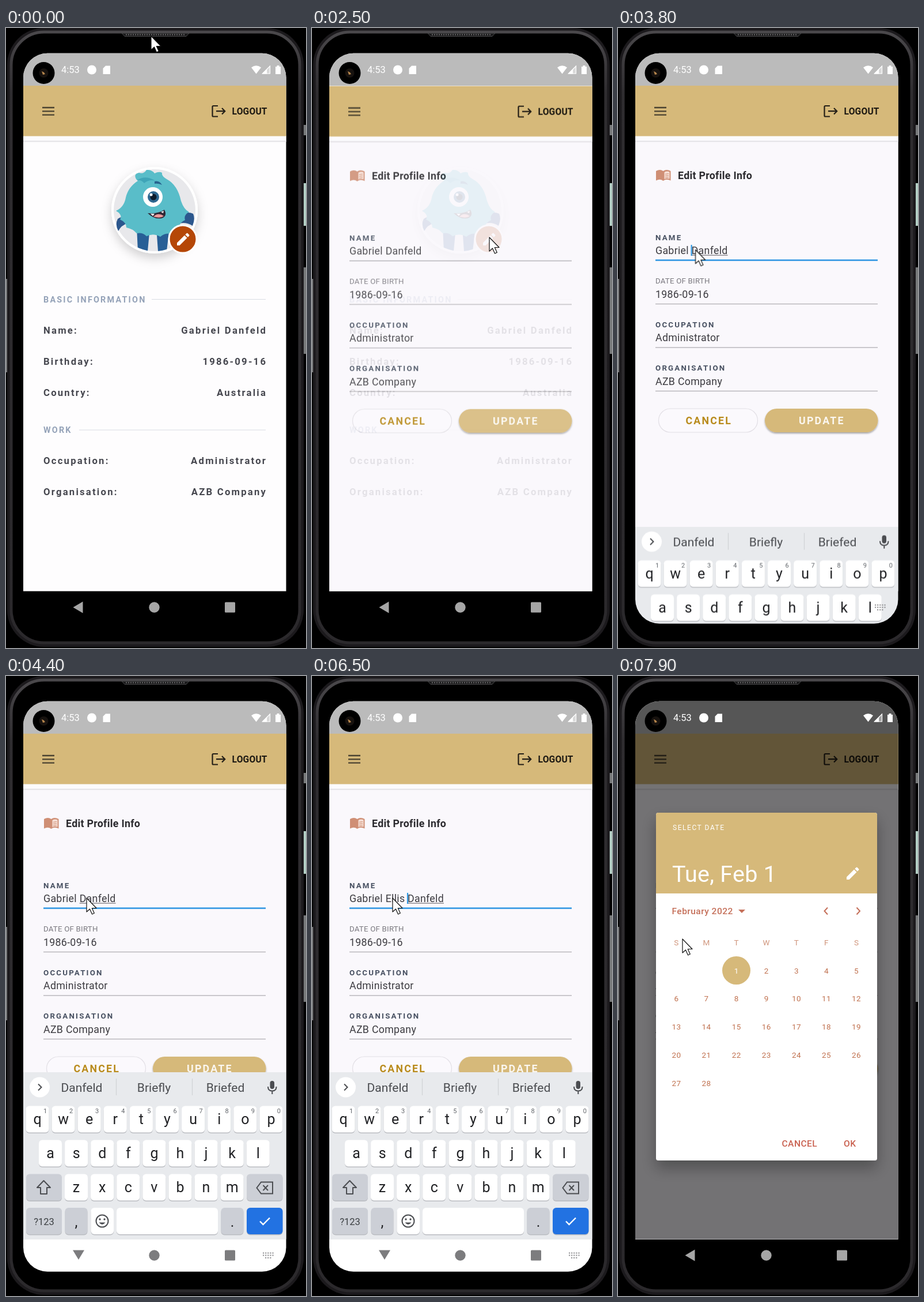
Write an HTML page that moves like this. It is 521 px wide and 1075 px high and loops after 8 s.

```html
<!DOCTYPE html>
<html lang="en">
<head>
<meta charset="utf-8">
<title>Profile editor</title>
<style>
html, body { margin: 0; width: 100%; height: 100%; overflow: hidden; background: #000; }
svg { display: block; width: 100vw; height: 100vh; }
text { font-family: Roboto, sans-serif; white-space: pre; }
.end { text-anchor: end; }
.mid { text-anchor: middle; }
.row { font-size: 16.7px; font-weight: 700; letter-spacing: 2.22px; fill: #46474f; }
.section { font-size: 14.4px; font-weight: 700; letter-spacing: 2.2px; fill: #94a2b8; }
.label { font-size: 13.3px; font-weight: 700; letter-spacing: 2.2px; fill: #475061; }
.plain { font-size: 13.3px; letter-spacing: .2px; fill: #7b7980; }
.value { font-size: 17.78px; letter-spacing: .3px; fill: #3c3b40; }
.title { font-size: 17.78px; font-weight: 700; letter-spacing: .3px; fill: #2b2a2e; }
.btn { font-size: 17.78px; font-weight: 700; letter-spacing: 2.2px; }
.key { font-size: 25px; fill: #202124; }
.num { font-size: 11px; fill: #5f6368; }
.hint { font-size: 21px; fill: #4a4c50; }
.day { font-size: 13.5px; letter-spacing: .4px; fill: #c0714f; }
.accent { font-size: 15.56px; font-weight: 500; letter-spacing: .45px; fill: #c5705a; }

#cursor { animation: point 8s linear infinite; }
#form { animation: rise 8s infinite, reveal 8s infinite; }
#focus { animation: focus 8s linear infinite; }
#cover { animation: cover 8s step-end infinite; }
#kb { animation: slide 8s infinite; }
#navDark { animation: dark 8s linear infinite; }
#navLight { animation: light 8s linear infinite; }
#kbIcon { animation: icon 8s step-end infinite; }
#dialog { animation: dialog 8s ease-out infinite; }

@keyframes point {
  0% { transform: translate(252px, 14px); }
  11.25% { transform: translate(262px, 300px); }
  17.5% { transform: translate(290px, 340px); }
  22.5%, 33.75% { transform: translate(308px, 363px); }
  36.25%, 37.5% { transform: translate(102px, 394px); }
  38.75%, 46.25% { transform: translate(129px, 384px); }
  48.75%, 83.75% { transform: translate(140px, 385px); }
  90%, 100% { transform: translate(112px, 456px); }
}
@keyframes rise {
  0%, 27.79% { transform: translateY(234px); animation-timing-function: cubic-bezier(.4, 0, .2, 1); }
  31.54%, 100% { transform: none; }
}
@keyframes reveal {
  0%, 27.79% { opacity: 0; animation-timing-function: ease-in; }
  31.54%, 100% { opacity: 1; }
}
@keyframes focus {
  0%, 43.75% { stroke: #b9b7bc; stroke-width: 1.3px; }
  46.25%, 94.4% { stroke: #3d9de4; stroke-width: 2.7px; }
  96.25%, 100% { stroke: #b9b7bc; stroke-width: 1.3px; }
}
@keyframes cover { 0% { opacity: 0; } 50% { opacity: 1; } 95% { opacity: 0; } }
@keyframes slide {
  0%, 46.25% { transform: translateY(350px); animation-timing-function: ease-out; }
  50%, 92.5% { transform: none; animation-timing-function: linear; }
  93.75% { transform: translateY(198.5px); animation-timing-function: linear; }
  94.9%, 100% { transform: translateY(350px); }
}
@keyframes dark { 0%, 46.25% { opacity: 1; } 47.25%, 92.5% { opacity: 0; } 93.75% { opacity: .15; } 95%, 100% { opacity: 1; } }
@keyframes light { 0%, 47.5% { opacity: 0; } 49.5%, 92.5% { opacity: 1; } 93.5%, 100% { opacity: 0; } }
@keyframes icon { 0% { opacity: 0; } 43.75% { opacity: 1; } 93% { opacity: 0; } }
@keyframes dialog { 0%, 95.6% { opacity: 0; } 98.2%, 100% { opacity: 1; } }
</style>
</head>
<body>
<svg viewBox="0 0 521 1075" preserveAspectRatio="none">
<defs>
  <clipPath id="screen"><rect x="30" y="43.7" width="456.5" height="989" rx="42"/></clipPath>
  <clipPath id="body"><rect x="30" y="100" width="457" height="876.5"/></clipPath>
  <clipPath id="disc"><circle cx="258" cy="316" r="71"/></clipPath>
  <linearGradient id="rim" x2="0" y2="1">
    <stop offset="0" stop-color="#4a484b"/>
    <stop offset=".1" stop-color="#2f2d30"/>
    <stop offset="1" stop-color="#2b292c"/>
  </linearGradient>
  <filter id="soft" x="-30%" y="-30%" width="160%" height="170%">
    <feDropShadow dx="0" dy="8" stdDeviation="9" flood-opacity=".18"/>
  </filter>
  <filter id="low" x="-10%" y="-20%" width="120%" height="160%">
    <feDropShadow dx="0" dy="2" stdDeviation="1.5" flood-opacity=".35"/>
  </filter>
  <filter id="deep" x="-20%" y="-10%" width="140%" height="125%">
    <feDropShadow dx="0" dy="13" stdDeviation="13" flood-opacity=".3"/>
  </filter>
  <g id="bar">
    <rect x="30" y="187" width="457" height="10" fill="#fcfbfd"/>
    <path d="M30 196.5H487" stroke="#e3e1e5" stroke-width="2"/>
    <rect x="30" y="100" width="457" height="87.5" fill="#d6b97a"/>
    <path d="M63 138H84M63 144.3H84M63 150.6H84" stroke="#4a4230" stroke-width="2.3"/>
    <path d="M368 135H360Q358.5 135 358.5 136.5V152Q358.5 153.5 360 153.5H368M365 144.2H380M375 139L380.2 144.2L375 149.5" fill="none" stroke="#241f17" stroke-width="2.2"/>
    <text x="392.5" y="149.5" font-size="15.6" font-weight="700" letter-spacing=".2" fill="#1c1812">LOGOUT</text>
  </g>
  <path id="pen" d="M-10 10V5.5L3 -7.5L7.5 -3L-5.5 10ZM4.3 -8.8L6.6 -11Q7.6 -12 8.6 -11L11 -8.6Q12 -7.6 11 -6.6L8.8 -4.3Z"/>
</defs>

<!-- handset -->
<g fill="#77797a">
  <rect y="435" width="3" height="162"/>
  <rect x="516" y="168" width="5" height="18"/>
  <rect x="516" y="415" width="5" height="150"/>
  <rect x="516" y="269" width="5" height="74" fill="#b3cfc5"/>
</g>
<rect x="2" y="0" width="515" height="1073" rx="64" fill="#1c1a1d"/>
<rect x="9" y="7" width="501" height="1059" rx="57" fill="#000" stroke="url(#rim)" stroke-width="5"/>
<path d="M201 9H318L313 14.5H206Z" fill="#1a1a1b" stroke="#4b4a4c"/>
<path d="M208 11.5H311" stroke="#6a696b" stroke-width="2" stroke-dasharray="2 2"/>

<g clip-path="url(#screen)">
  <rect x="30" y="43" width="457" height="933.5" fill="#fefdfe"/>
  <rect x="30" y="43" width="457" height="57" fill="#bbb"/>

  <g clip-path="url(#body)">
    <use href="#bar"/>
    <g id="profile">
      <circle cx="258" cy="316" r="75" fill="#fff" filter="url(#soft)"/>
      <circle cx="258" cy="316" r="71" fill="#e8e8eb"/>
      <g clip-path="url(#disc)">
        <path d="M227 345H250L246 387H229ZM261 345H284L279 387H264ZM290 345H312L305 387H288Z" fill="#285f96"/>
      </g>
      <path d="M194 331Q202 325 216 327L212 338Q200 342 195 352Q189 341 194 331ZM301 325Q314 317 325 322Q329 331 324 343Q313 336 301 339Z" fill="#2c578d"/>
      <path d="M226 262Q221 253 231 251Q239 254 244 246Q253 245 258 252Q266 248 271 251Q270 257 279 262Q298 272 304 300Q309 315 318 319Q308 324 311 333Q303 336 300 345Q292 347 287 357Q276 355 268 362Q256 355 244 361Q237 354 227 356Q220 348 209 346Q209 337 198 332Q203 324 191 317Q205 311 208 294Q212 276 229 265Z" fill="#59bdc9"/>
      <path d="M227 264Q243 254 259 265Q249 262 240 269Q235 263 227 264Z" fill="#3fa5b8"/>
      <path d="M258 266Q266 264 271 272Q264 269 258 270Z" fill="#28648f"/>
      <circle cx="255" cy="293" r="17" fill="#fff"/>
      <circle cx="256" cy="293" r="10" fill="#2d668f"/>
      <circle cx="256" cy="293" r="5.5" fill="#0d1b2b"/>
      <circle cx="252" cy="289" r="2.5" fill="#fff"/>
      <path d="M246 321Q263 323 275 315Q281 326 270 330Q257 332 246 321Z" fill="#312836"/>
      <path d="M256 327Q264 319 274 326Q268 331 256 327Z" fill="#ee9a9a"/>
      <path d="M251 322L258 322L255 326ZM269 319L274 317L273 321Z" fill="#fff"/>
      <circle cx="307" cy="366" r="24" fill="#b54707" stroke="#fff" stroke-width="3"/>
      <use href="#pen" transform="translate(307 367)" fill="#fff"/>
      <text class="section" x="65" y="476">BASIC INFORMATION</text>
      <text class="section" x="65" y="701.5">WORK</text>
      <path d="M253 470.5H451M127 697H451" stroke="#d9dce3" stroke-width="1.2"/>
      <g id="rows"></g>
    </g>

    <g id="form">
      <rect x="30" y="43" width="457" height="934" fill="#faf8fc"/>
      <use href="#bar"/>
      <path d="M66 248Q73 244 78.5 248Q84 244 91.5 248V264.5Q84 261 78.5 265Q73 261 66 264.5Z" fill="#cf8f75"/>
      <path d="M80.5 250Q85 247.5 89.5 249.5V261.5Q85 260 80.5 262Z" fill="#f6dfd5"/>
      <path d="M82 253.5L88 252.5M82 256.5L88 255.5M82 259.5L88 258.5" stroke="#cf8f75" stroke-width="1.2"/>
      <text class="title" x="104" y="261.5">Edit Profile Info</text>
      <g id="fields"></g>
      <path id="mark" stroke="#8c8b90" stroke-width="1.6"/>
      <path id="caret" stroke="#2f97e0" stroke-width="2.2"/>
      <path id="focus" d="M65 402.6H451"/>
      <rect x="70.5" y="660" width="172" height="41" rx="20.5" fill="#fbf9fd" stroke="#e2dfe5" stroke-width="1.2"/>
      <rect x="255" y="660" width="196.5" height="41" rx="20.5" fill="#d6b97a" filter="url(#low)"/>
      <text class="btn" x="117.5" y="686.5" fill="#b98b1c">CANCEL</text>
      <text class="btn" x="314" y="686.5" fill="#fbf7f0">UPDATE</text>
      <rect id="cover" x="30" y="687" width="457" height="290" fill="#faf8fc"/>
    </g>
  </g>

  <g id="dialog">
    <rect x="30" y="43" width="457" height="933.5" fill="#000" opacity=".54"/>
    <rect x="66" y="237" width="384" height="603" rx="4" fill="#fff" filter="url(#deep)"/>
    <path d="M66 377V241Q66 237 70 237H446Q450 237 450 241V377Z" fill="#d6b97a"/>
    <text x="95" y="267" font-size="12" letter-spacing="1.55" fill="#fff">SELECT DATE</text>
    <text x="94" y="356.5" font-size="39.5" letter-spacing=".25" fill="#fff">Tue, Feb 1</text>
    <use href="#pen" transform="translate(407 343)" fill="#fff"/>
    <text class="accent" x="93.5" y="413">February 2022</text>
    <path d="M209 405H221L215 411Z" fill="#c5705a"/>
    <path d="M364 401.5L358.5 407.5L364 413.5M414.5 401.5L420 407.5L414.5 413.5" fill="none" stroke="#c5705a" stroke-width="2"/>
    <circle cx="205.5" cy="510.5" r="24.5" fill="#d6b97a"/>
    <g id="days"></g>
    <text class="accent" x="284.5" y="815.5" style="fill:#c9604f">CANCEL</text>
    <text class="accent" x="392" y="815.5" style="fill:#c9604f">OK</text>
  </g>

  <g fill="#fff">
    <text x="96" y="78.3" font-size="16.5">4:53</text>
    <circle cx="149" cy="72.5" r="8"/>
    <path d="M173 65.5H181V80H168.5V70Z"/>
    <path d="M426 68.5Q434.5 62 443 68.5L434.5 79.5Z"/>
    <path d="M459 65V79.5H444.5Z" fill-opacity=".45"/>
    <path d="M453 71V79.5H444.5Z"/>
    <path d="M458.5 66V79H445.5Z" fill="none" stroke="#fff" stroke-width="1.2"/>
    <path d="M468 67H470.5V65H474.5V67H477V80H468Z"/>
  </g>

  <g id="kb">
    <rect x="30" y="687" width="457" height="290" fill="#e8eaed"/>
    <rect x="30" y="977" width="457" height="58" fill="#fff"/>
    <g id="keys"></g>
    <circle cx="58.5" cy="713" r="17.5" fill="#fff"/>
    <path d="M56 707.5L61.5 713L56 718.5" fill="none" stroke="#4b4d51" stroke-width="2"/>
    <g id="hints"></g>
    <rect x="458.5" y="702" width="7.5" height="14" rx="3.7" fill="#4b4d51"/>
    <path d="M455 712Q455 719.5 462.3 719.5Q469.5 719.5 469.5 712M462.3 719.5V725" fill="none" stroke="#4b4d51" stroke-width="2"/>
    <path d="M65.5 875L77 887H71V898H60V887H54Z" fill="none" stroke="#4b4d51" stroke-width="2" stroke-linejoin="round"/>
    <path d="M443 877.5H463V897.5H443L435.5 887.5ZM446.5 883L455 892M455 883L446.5 892" fill="none" stroke="#4b4d51" stroke-width="2"/>
    <circle cx="167" cy="945" r="10.5" fill="none" stroke="#4b4d51" stroke-width="2"/>
    <circle cx="163" cy="942" r="1.7" fill="#4b4d51"/><circle cx="171" cy="942" r="1.7" fill="#4b4d51"/>
    <path d="M161.5 947.5Q167 954.5 172.5 947.5Z" fill="#4b4d51"/>
    <path d="M441 945.5L446.5 951L458 939.5" fill="none" stroke="#fff" stroke-width="2.4"/>
  </g>

  <g id="navDark" fill="#a6a6a6">
    <path d="M116.5 1004.5L133.5 994.5V1014.5Z"/>
    <circle cx="257.5" cy="1004.5" r="9.2"/>
    <rect x="380" y="995.5" width="18" height="18" rx="1.5"/>
  </g>
  <g id="navLight" fill="#7c7c7e">
    <path d="M116 995.5H136L126 1012Z"/>
    <circle cx="257.5" cy="1004.5" r="9.2"/>
    <rect x="380" y="995.5" width="18" height="18" rx="1.5"/>
  </g>
  <path id="kbIcon" d="M446 1000.5H465M446 1004.5H465M450 1008.8H461" stroke="#8e8e91" stroke-width="2" stroke-dasharray="2.2 1.9"/>
</g>

<circle cx="65.5" cy="78" r="19" fill="#000"/>
<circle cx="65.5" cy="78" r="8" fill="#17120f"/>
<path d="M62 75L66 77L68 80L64 81Z" fill="#b5854c"/>

<g id="cursor">
  <path d="M0 0V24L5.5 19L9.5 28L13.3 26.3L9.3 17.5H17Z" fill="#fff" stroke="#111" stroke-width="1.2" stroke-linejoin="round"/>
</g>
</svg>

<script>
const $ = id => document.getElementById(id);
const text = (x, y, cls, s, extra = '') => `<text x="${x}" y="${y}" class="${cls}" ${extra}>${s}</text>`;
const FIRST = 'Gabriel ', MIDDLE = 'Ellis ', LAST = 'Danfeld';
const COMPANY = 'AZB Company';

$('rows').innerHTML = [
  [530, 'Name:', FIRST + LAST],
  [584, 'Birthday:', '1986-09-16'],
  [637.5, 'Country:', 'Australia'],
  [756, 'Occupation:', 'Administrator'],
  [809.5, 'Organisation:', COMPANY]
].map(([y, a, b]) => text(65, y, 'row', a) + text(453.2, y, 'row end', b)).join('');

$('fields').innerHTML = [
  ['label', 'NAME', FIRST + LAST],
  ['plain', 'DATE OF BIRTH', '1986-09-16'],
  ['label', 'OCCUPATION', 'Administrator'],
  ['label', 'ORGANISATION', COMPANY]
].map(([cls, a, b], i) => {
  const y = 403 + i * 75.5;
  return text(65, y - 35.5, cls, a) + text(65, y - 11, 'value', b, i ? '' : 'id="name"') +
    `<path d="M65 ${y}H451" stroke="#b9b7bc" stroke-width="1.3"/>`;
}).join('');

// Calendar: the month starts on a Tuesday
const dayX = i => 101.5 + i * 52.1;
let days = [...'SMTWTFS'].map((d, i) => text(dayX(i), 467, 'day mid', d, 'opacity=".75"')).join('');
for (let d = 1; d <= 28; d++) {
  const cell = d + 1;
  days += text(dayX(cell % 7), 515.5 + Math.floor(cell / 7) * 48.8, 'day mid', d, d === 1 ? 'style="fill:#fff"' : '');
}
$('days').innerHTML = days;

// Keyboard
const box = (x, y, w, fill) =>
  `<rect x="${x}" y="${y + 1.5}" width="${w}" height="46" rx="6" fill="#babcc1"/>` +
  `<rect x="${x}" y="${y}" width="${w}" height="46" rx="6" fill="${fill}"/>`;
const PITCH = 45.1, GREY = '#cccfd6';
let keys = '';
[['qwertyuiop', 54.5, 745.5], ['asdfghjkl', 77, 804.5], ['zxcvbnm', 122, 863.5]].forEach(([row, x0, y], r) => {
  [...row].forEach((c, i) => {
    const x = x0 + i * PITCH;
    keys += box(x - 20, y, 40, '#fff') + text(x, y + 31, 'key mid', c);
    if (!r) keys += text(x + 13.5, y + 12.5, 'num mid', (i + 1) % 10);
  });
});
keys += box(35, 863.5, 62, GREY) + box(418, 863.5, 62.5, GREY);
[[35, 62, GREY], [102.5, 39, GREY], [147.5, 39.5, '#fff'], [192, 176, '#fff'], [373.5, 39, GREY], [418, 62.5, '#2272e2']]
  .forEach(([x, w, fill]) => keys += box(x, 922, w, fill));
keys += text(66, 951.5, 'mid', '?123', 'font-size="16.5" fill="#3c4043"') +
  text(122, 955, 'key mid', ',') + text(393, 955, 'key mid', '.');
$('keys').innerHTML = keys;

$('hints').innerHTML = [131.5, 257, 381].map(x => text(x, 721, 'hint mid', '')).join('') +
  '<path d="M191.5 698V727M323.5 698V727" stroke="#cfd1d6" stroke-width="1.2"/>';
const slots = [...$('hints').querySelectorAll('text')];

const strokes = [4900, 5100, 5300, 5700, 6000, 6300];
const usual = [LAST, 'Briefly', 'Briefed'];
const hints = [
  [0, usual],
  [4900, ['E' + LAST, 'Even', 'Evening']],
  [5100, ['El' + LAST, 'Else', 'Elegant']],
  [5300, ['Ell' + LAST, 'Elder', 'Elevated']],
  [5500, ['Ell' + LAST, 'Ellipse', 'Elevated']],
  [5700, ['Elli' + LAST, 'Ellipse', 'Elliptic']],
  [6000, ['Ellis' + LAST, 'Ellipse', 'Elliptic']],
  [6300, usual],
  [7200, ['', '', '']]
];

const name = $('name');
const put = (el, s) => { if (el.textContent !== s) el.textContent = s; };
const show = (el, on) => el.style.visibility = on ? 'visible' : 'hidden';

function draw(t) {
  const n = strokes.filter(k => k <= t).length;
  put(name, FIRST + MIDDLE.slice(0, n) + LAST);
  const at = i => 65 + name.getSubStringLength(0, i);
  const caret = FIRST.length + n;
  // the typed letters join the surname until the space splits them
  const from = n === MIDDLE.length ? caret : FIRST.length;
  const active = t >= 3500 && t < 7200;
  const since = t - (n ? strokes[n - 1] : 3500);

  $('caret').setAttribute('d', `M${at(caret)} 376V395`);
  show($('caret'), active && since % 1000 < 500);
  $('mark').setAttribute('d', `M${at(from)} 394H${at(caret + LAST.length)}`);
  show($('mark'), active);

  const words = hints.filter(h => h[0] <= t).pop()[1];
  slots.forEach((el, i) => put(el, words[i]));
  show($('hints').querySelector('path'), t < 7200);
}

let start;
function tick(now) {
  start ??= now;
  draw((now - start) % 8000);
  requestAnimationFrame(tick);
}
requestAnimationFrame(tick);
</script>
</body>
</html>
```
